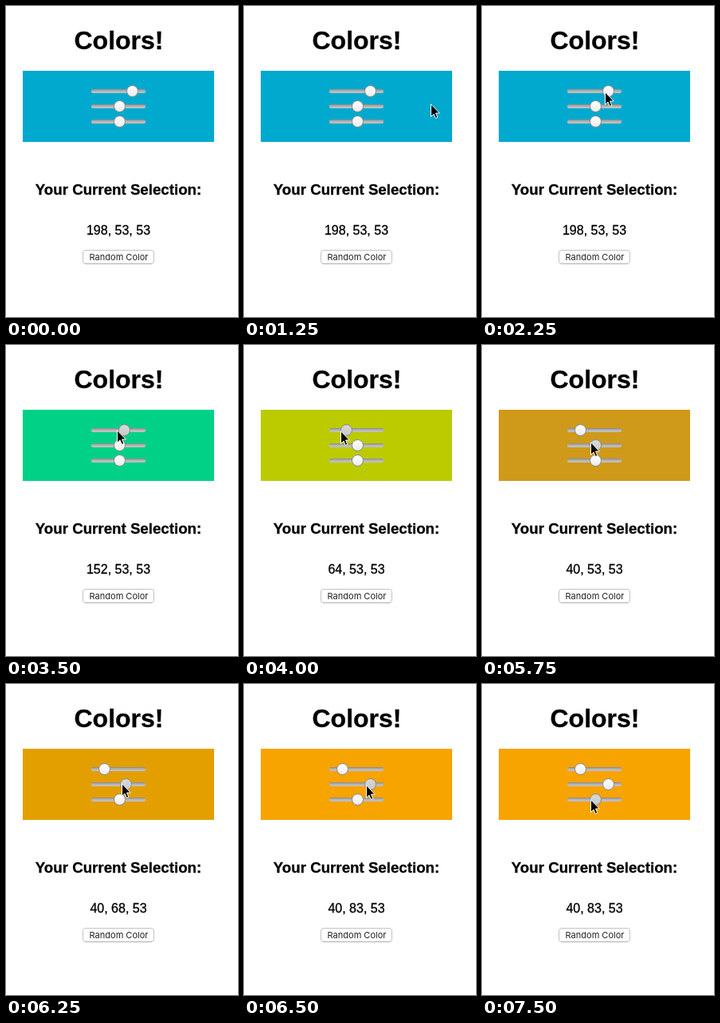
Animation, 291 px wide and 389 px high, one loop 8 s. Source, as an HTML page:

```html
<!DOCTYPE html>
<html lang="en">
<head>
<meta charset="utf-8">
<title>Colors!</title>
<style>
  html, body { margin: 0; width: 100%; height: 100%; overflow: hidden; background: #fff; }
  svg { display: block; }
  text { font-family: "Liberation Sans", Arial, sans-serif; text-anchor: middle; stroke: #000; stroke-width: .3; }
  .bold { font-weight: bold; }
  .label { font: 11px Inter, sans-serif; fill: #222; stroke: none; }
</style>
</head>
<body>
<svg width="291" height="389" viewBox="0 0 291 389">
  <defs>
    <linearGradient id="groove" x2="0" y2="1">
      <stop offset="0" stop-color="#858585"/>
      <stop offset=".4" stop-color="#b2b2b2"/>
      <stop offset="1" stop-color="#c4c4c4"/>
    </linearGradient>
    <linearGradient id="up" x2="0" y2="1">
      <stop offset="0" stop-color="#fff"/>
      <stop offset="1" stop-color="#ebebeb"/>
    </linearGradient>
    <linearGradient id="down" x2="0" y2="1">
      <stop offset="0" stop-color="#d9d9d9"/>
      <stop offset="1" stop-color="#c9c9c9"/>
    </linearGradient>
    <!-- Wide-gamut screen colours, in linear light -->
    <filter id="vivid" x="0" y="0" width="1" height="1">
      <feColorMatrix values="1.22 -.22 0 0 0  -.09 1.13 0 0 0  -.06 -.09 1.15 0 0  0 0 0 1 0"/>
    </filter>
  </defs>
  <text class="bold" x="141.5" y="54" font-size="32">Colors!</text>
  <rect id="panel" x="21" y="81" width="240" height="89" filter="url(#vivid)"/>
  <g id="sliders"></g>
  <text class="bold" x="141" y="236" font-size="18.72">Your Current Selection:</text>
  <text id="value" x="141" y="286" font-size="16"></text>
  <rect x="96.5" y="305.5" width="89" height="17" rx="3.5" fill="#fff" stroke="#c3c3c3"/>
  <path d="M99 322.5H183" stroke="#adadad"/>
  <text class="label" x="141.5" y="318">Random Color</text>
  <path id="cursor" d="M.5 .8V16.4L4 13.1 6.3 18.4 8.8 17.3 6.5 12H11.3Z" stroke="#fff"/>
</svg>
<script>
const $ = id => document.getElementById(id);
const LOOP = 8000, STEP = 250, ENTER = 1250;

// Key points are [time, value...]; knobs sit at base + scale * value
const sliders = [
  { base: 114, scale: 0.224, hold: [3250, 5000],
    keys: [[3250, 198], [3500, 152], [3750, 90], [4000, 64], [4250, 43], [4750, 40]] },
  { base: 115, scale: 0.52, hold: [5750, 6750], keys: [[6000, 53], [6500, 83]] },
  { base: 115, scale: 0.52, hold: [7500, LOOP], keys: [[0, 53]] }
];
const pointer = [
  [ENTER, 234, 122], [1500, 177, 106], [2000, 154, 107], [3250, 154, 107],
  [3500, 139, 106], [4000, 121, 107], [5000, 116, 107], [5500, 136, 121],
  [6000, 136, 121], [6500, 153, 126], [6750, 153, 126], [7000, 136, 144]
];

// Linear interpolation, held before the first and after the last key
function at(keys, t) {
  const i = keys.findIndex(k => k[0] > t);
  const to = keys.at(i), from = i > 0 ? keys[i - 1] : to;
  const p = to === from ? 0 : (t - from[0]) / (to[0] - from[0]);
  return to.slice(1).map((v, n) => Math.round(from[n + 1] + (v - from[n + 1]) * p));
}

$("sliders").innerHTML = sliders.map((s, i) => {
  const y = 106.5 + 19 * i;
  return `<rect x="107" y="${y - 2.5}" width="68" height="5" rx="2" fill="url(#groove)"/>
    <circle cy="${y}" r="7" stroke="#858585"/>`;
}).join("");
const knobs = document.querySelectorAll("circle");

function draw(now) {
  const t = Math.floor(now % LOOP / STEP) * STEP;
  const values = sliders.map(({ base, scale, hold, keys }, i) => {
    const [value] = at(keys, t);
    const held = t >= hold[0] && t < hold[1];
    knobs[i].setAttribute("cx", Math.floor(base + scale * value + 0.4) + 0.5);
    knobs[i].setAttribute("fill", `url(#${held ? "down" : "up"})`);
    return value;
  });
  const [hue, sat, light] = values;
  $("panel").setAttribute("fill", `hsl(${hue}, ${sat}%, ${light}%)`);
  $("value").textContent = values.join(", ");
  $("cursor").setAttribute("visibility", t < ENTER ? "hidden" : "visible");
  $("cursor").setAttribute("transform", `translate(${at(pointer, t)})`);
  requestAnimationFrame(draw);
}
requestAnimationFrame(draw);
</script>
</body>
</html>
```
